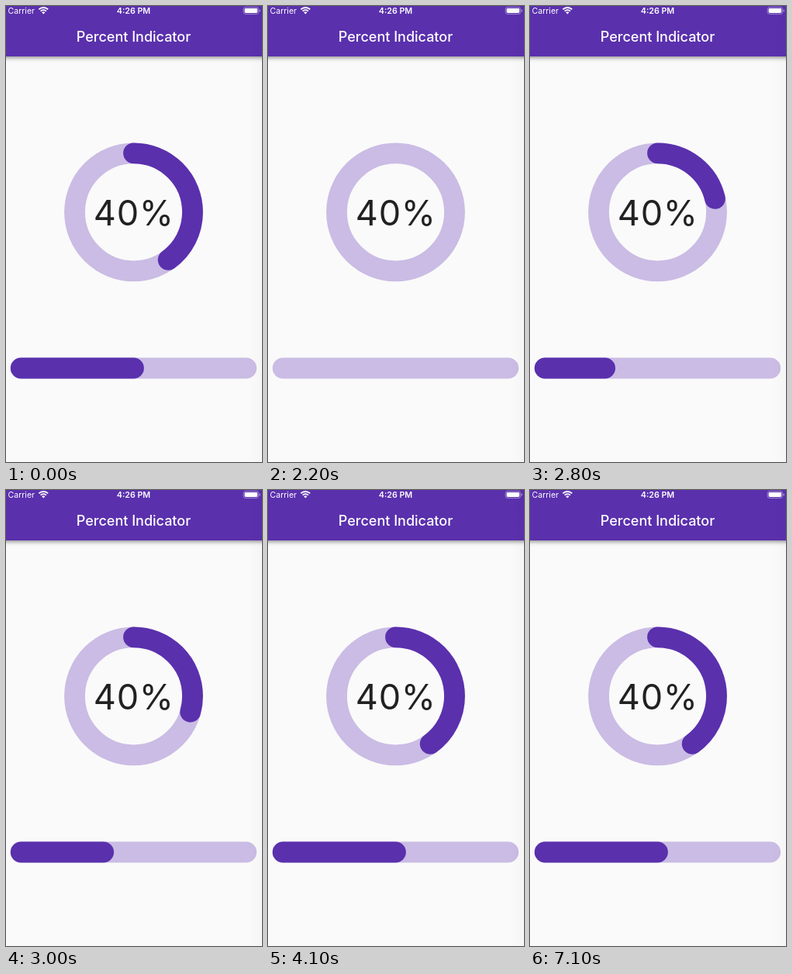
Write an HTML page with a canvas that moves like this. It is 330 by 588 pixels and loops after 8 s.

```html
<!DOCTYPE html>
<html lang="en">
<head>
<meta charset="utf-8">
<title>Percent Indicator</title>
<style>
  html, body { margin: 0; width: 100%; height: 100%; overflow: hidden; background: #fafafa; }
  canvas { display: block; width: 330px; height: 588px; }
</style>
</head>
<body>
<canvas id="stage"></canvas>
<script>
const W = 330, H = 588, LOOP = 8000, STEP = 100;
const FILL_START = 2267, FILL_TIME = 1000, RESET = 2200;
const PURPLE = '#5a30ad', TRACK = '#cabce4', PAPER = '#fafafa', INK = '#212121';
const RING = { x: 164.5, y: 265.8, r: 76, share: 0.4 };
const BAR = { x0: 19.2, x1: 309.7, y: 467, share: 0.5 };
const THICK = 26.8;

const canvas = document.getElementById('stage');
const ctx = canvas.getContext('2d');
const scale = window.devicePixelRatio || 1;
canvas.width = W * scale;
canvas.height = H * scale;
ctx.scale(scale, scale);

function text(str, x, y, size, weight, color, align = 'center', spacing = 0) {
  ctx.font = `${weight} ${size}px Inter, Roboto, sans-serif`;
  ctx.letterSpacing = spacing + 'px';
  ctx.textAlign = align;
  ctx.fillStyle = color;
  ctx.fillText(str, x, y);
}

function stroke(color, width, cap, trace) {
  ctx.strokeStyle = color;
  ctx.lineWidth = width;
  ctx.lineCap = cap;
  ctx.beginPath();
  trace();
  ctx.stroke();
}

function box(x, y, w, h, r) {
  ctx.beginPath();
  ctx.roundRect(x, y, w, h, r);
}

function wifi(x, y) {
  const a = Math.PI / 4;
  for (const r of [8.4, 5.2]) {
    stroke('#fff', 1.8, 'butt', () => ctx.arc(x, y, r, -Math.PI / 2 - a, -Math.PI / 2 + a));
  }
  ctx.fillStyle = '#fff';
  ctx.beginPath();
  ctx.moveTo(x, y);
  ctx.arc(x, y, 3, -Math.PI / 2 - a, -Math.PI / 2 + a);
  ctx.fill();
}

function battery() {
  box(306.2, 1.6, 19.4, 8.8, 2.6);
  ctx.strokeStyle = 'rgba(255,255,255,0.45)';
  ctx.lineWidth = 0.9;
  ctx.stroke();
  ctx.fillStyle = '#fff';
  box(307.6, 3, 16.6, 6, 1.4);
  ctx.fill();
  ctx.fillStyle = 'rgba(255,255,255,0.5)';
  box(326.6, 4.6, 1.2, 2.9, 0.6);
  ctx.fill();
}

function header() {
  ctx.save();
  ctx.shadowColor = 'rgba(0,0,0,0.42)';
  ctx.shadowBlur = 5 * scale;
  ctx.shadowOffsetY = 2 * scale;
  ctx.fillStyle = PURPLE;
  ctx.fillRect(-10, -10, W + 20, 75);
  ctx.restore();
  text('Carrier', 2.6, 10, 10.5, 400, '#fff', 'left');
  wifi(48.3, 10.4);
  text('4:26 PM', 164.5, 10, 10.7, 600, '#fff');
  battery();
  text('Percent Indicator', 164.5, 46, 18, 500, '#fff');
}

function edgeShade() {
  const g = ctx.createLinearGradient(312, 0, W, 0);
  g.addColorStop(0, 'rgba(0,0,0,0)');
  g.addColorStop(1, 'rgba(0,0,0,0.02)');
  ctx.fillStyle = g;
  ctx.fillRect(312, 0, W - 312, H);
}

function ring(color, share, cap) {
  const top = -Math.PI / 2;
  stroke(color, THICK, cap, () => ctx.arc(RING.x, RING.y, RING.r, top, top + share * 2 * Math.PI));
}

function bar(color, share) {
  stroke(color, THICK, 'round', () => {
    ctx.moveTo(BAR.x0, BAR.y);
    ctx.lineTo(BAR.x0 + (BAR.x1 - BAR.x0) * share, BAR.y);
  });
}

function progress(t) {
  if (t < RESET) return 1;
  return Math.min(1, Math.max(0, (t - FILL_START) / FILL_TIME));
}

function draw(t) {
  const p = progress(t);
  ctx.fillStyle = PAPER;
  ctx.fillRect(0, 0, W, H);
  ring(TRACK, 1, 'butt');
  bar(TRACK, 1);
  if (p > 0) {
    ring(PURPLE, RING.share * p, 'round');
    bar(PURPLE, BAR.share * p);
  }
  text('40%', 164.8, 282.5, 45, 400, INK, 'center', 0.8);
  header();
  edgeShade();
}

const start = performance.now();
function tick() {
  const t = (performance.now() - start) % LOOP;
  draw(Math.floor(t / STEP) * STEP);
  requestAnimationFrame(tick);
}
tick();
</script>
</body>
</html>
```
